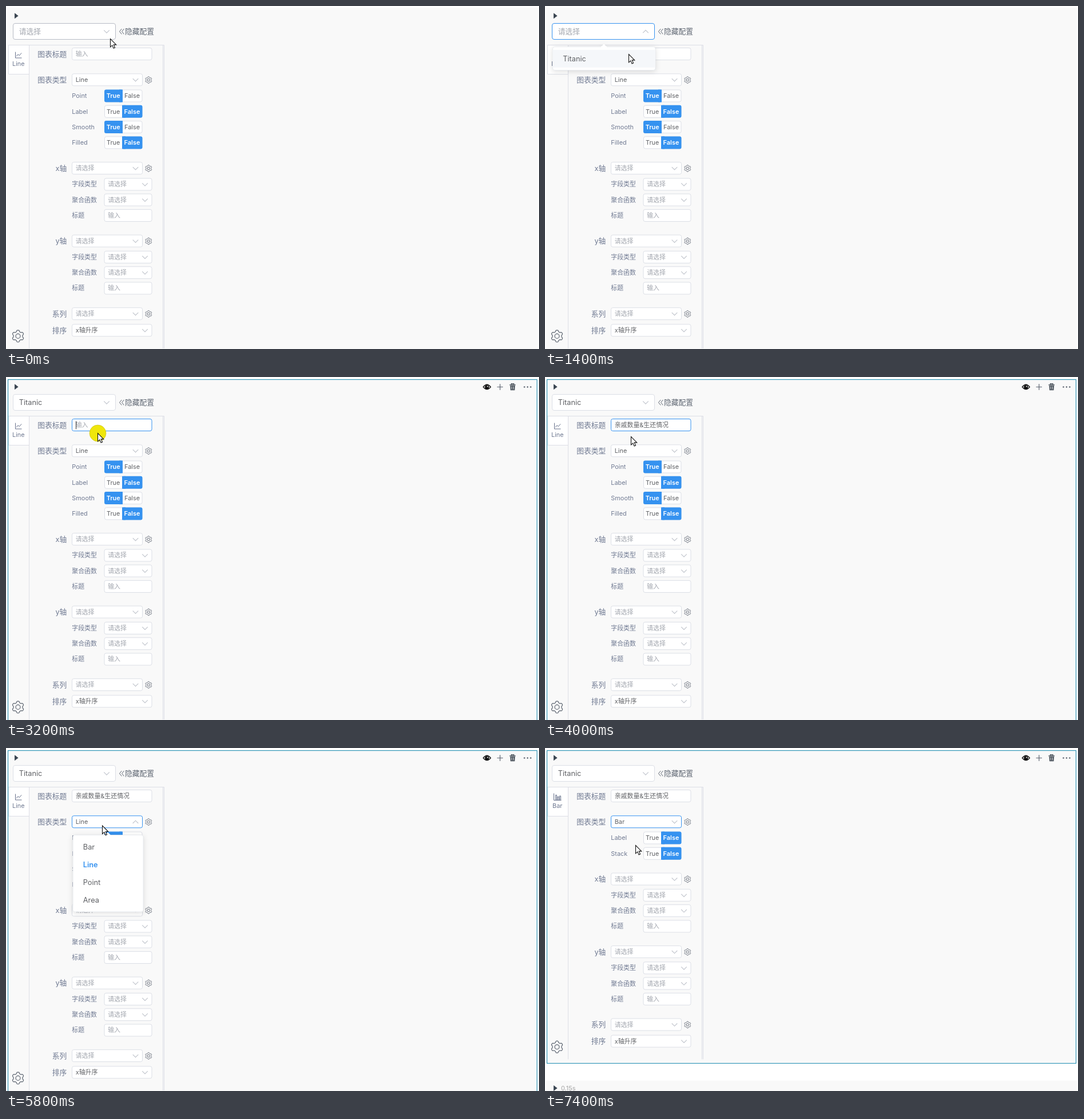
Write an HTML page that moves like this. It is 932 px wide and 601 px high and loops after 8000 ms.

```html
<!DOCTYPE html>
<html lang="zh-CN">
<head>
<meta charset="utf-8">
<title>Chart configuration</title>
<style>
  html, body { margin: 0; width: 100%; height: 100%; overflow: hidden; background: #fff; }
  svg { display: block; width: 932px; height: 601px; }
  text { font-family: Inter, 'Noto Sans CJK SC', 'Noto Sans CJK', sans-serif; white-space: pre; }
  .pop { filter: drop-shadow(0 2px 5px rgba(0, 0, 0, .13)); }
</style>
</head>
<body>
<svg id="stage" viewBox="0 0 932 601"></svg>
<script>
const LOOP = 8000, STEP = 200;
const BIG = 12.74, SMALL = 10.92, ROW = 27.3;
const BLUE = '#3592f0', EDGE = '#dcdfe6', HOVER = '#b8bcc5';
const INK = '#606266', LABEL = '#717b93', HINT = '#a3a7af', MARK = '#c0c4cc', ICON = '#5c6470';
const TITLE = '亲戚数量&amp;生还情况';

const stage = document.getElementById('stage');
const within = (t, a, b) => t >= a && t < b;

const text = (s, x, cy, size, fill, extra = '') =>
  `<text x="${x}" y="${cy + size * .365}" font-size="${size}" fill="${fill}" ${extra}>${s}</text>`;
const rect = (x, y, w, h, fill, extra = '') =>
  `<rect x="${x}" y="${y}" width="${w}" height="${h}" fill="${fill}" ${extra}/>`;
const stroke = (d, color, width = 1, extra = '') =>
  `<path d="${d}" fill="none" stroke="${color}" stroke-width="${width}" ${extra}/>`;
const fade = (opacity, content) => `<g opacity="${opacity}">${content}</g>`;

function chevron(x, y, up) {
  const d = up ? -2.4 : 2.4;
  return stroke(`M${x - 4.8} ${y - d}L${x} ${y + d}L${x + 4.8} ${y - d}`, MARK, 1.1);
}

function box(x, cy, w, value, color, border = EDGE) {
  return rect(x + .5, cy - 10.5, w - 1, 21, '#fff', `rx="3" stroke="${border}"`) +
    text(value, x + 6.7, cy, SMALL, color);
}

function select(x, cy, w, value, color = HINT, border = EDGE, up = false) {
  return box(x, cy, w, value, color, border) + chevron(x + w - 12.5, cy + .3, up);
}

function gear(x, y, r, width) {
  let d = '';
  for (let i = 0; i < 72; i++) {
    const a = i * Math.PI / 36;
    const q = r * (.88 + .12 * Math.tanh(-2.5 * Math.cos(6 * a)));
    d += `${i ? 'L' : 'M'}${(x + q * Math.cos(a)).toFixed(2)} ${(y + q * Math.sin(a)).toFixed(2)}`;
  }
  return stroke(d + 'Z', ICON, width, 'stroke-linejoin="round"') +
    `<circle cx="${x}" cy="${y}" r="${r * .38}" fill="none" stroke="${ICON}" stroke-width="${width}"/>`;
}

const label = (s, cy) => text(s, 106.3, cy, BIG, LABEL, 'text-anchor="end"');
const sublabel = (s, cy) => text(s, 115.3, cy, SMALL, LABEL);
const smallGear = cy => gear(249.3, cy + .3, 5.8, .95);

function toggle(name, on, cy) {
  const word = (s, x, active) =>
    text(s, x, cy, SMALL, active ? '#fff' : INK, `text-anchor="middle" font-weight="${active ? 600 : 400}"`);
  return sublabel(name, cy) +
    rect(172.5, cy - 10.5, 65.5, 21, '#fff', `rx="3" stroke="${EDGE}"`) +
    (on ? rect(172, cy - 11, 32, 22, BLUE, 'rx="3"') + rect(198, cy - 11, 6, 22, BLUE)
        : rect(203, cy - 11, 35.5, 22, BLUE, 'rx="3"') + rect(203, cy - 11, 6, 22, BLUE)) +
    word('True', 187.7, on) + word('False', 220.5, !on);
}

function axis(name, cy) {
  return label(name, cy) + select(115, cy, 124, '请选择') + smallGear(cy) +
    sublabel('字段类型', cy + 28.3) + select(171.5, cy + 28.3, 84, '请选择') +
    sublabel('聚合函数', cy + 55.5) + select(171.5, cy + 55.5, 84, '请选择') +
    sublabel('标题', cy + 82.8) + box(171.5, cy + 82.8, 84, '输入', HINT);
}

const playIcon = cy => `<path d="M15 ${cy - 5}L21.6 ${cy}L15 ${cy + 5}Z" fill="#3b4652"/>`;

function tools() {
  return `<path d="M834.5 17.5Q841 9 847.5 17.5Q841 25.5 834.5 17.5Z" fill="#fff" stroke="#111" stroke-width="1.4"/>
    <circle cx="841" cy="17.6" r="3.7" fill="#111"/><circle cx="842" cy="16.4" r="1" fill="#fff"/>` +
    stroke('M858.7 17.5H869M863.9 12.3V22.7', ICON, 1.2) +
    stroke('M880.5 13.8H891M883.6 13V11.8H888V13', '#505861', 1.4) +
    `<path d="M881.5 15H890.2L889.6 23.2H882.1Z" fill="#505861"/>` +
    stroke('M884.3 16.5V21.5M887.4 16.5V21.5', '#f9f9f9', .8) +
    [906.5, 912, 917.5].map(x => `<circle cx="${x}" cy="17.5" r="1.3" fill="${ICON}"/>`).join('');
}

function tab(bar) {
  const icon = bar
    ? 'M15.5 79.5V91.5H28.5M18.5 91V82.5H20.5V91M22 91V85.5H24V91M25.5 91V84H27.5V91'
    : 'M16.5 80.5V91H27.5M18.3 88L21 84.7L23.3 86.7L27.2 82.3';
  return rect(4, 69, 36, 50, '#fff') + stroke('M4.5 69V119.5H40', EDGE) +
    stroke(icon, '#66708a', 1) +
    text(bar ? 'Bar' : 'Line', 21.8, 101, SMALL, LABEL, 'text-anchor="middle"');
}

// A popper panel that unfolds downward from its top edge.
function popper(x, y, w, h, tip, rows, active, hovered, grow, opacity) {
  const items = rows.map((s, i) => {
    const cy = y + 21.3 + i * 31;
    const chosen = s === active;
    return (i === hovered ? rect(x + .5, cy - 15.5, w - 1, 31, '#f5f7fa') : '') +
      text(s, x + 18.3, cy, BIG, chosen ? BLUE : INK, `font-weight="${chosen ? 600 : 400}"`);
  }).join('');
  return `<g opacity="${opacity}" transform="translate(0 ${y * (1 - grow)}) scale(1 ${grow})">
    <g class="pop">${rect(x + .5, y + .5, w - 1, h - 1, '#fff', 'rx="3.5" stroke="#e4e7ed" stroke-width=".8"')}
    <path d="M${tip - 5.5} ${y + 1}L${tip} ${y - 4.6}L${tip + 5.5} ${y + 1}Z" fill="#fff"/></g>${items}</g>`;
}

const path = [
  [0, 182, 57], [600, 182, 57], [1200, 156, 74], [1400, 146, 84], [3800, 146, 84],
  [4000, 150, 104], [4600, 158, 129], [5600, 158, 129], [6200, 188, 149],
  [6600, 158, 170], [LOOP, 158, 170]
];
const presses = [[200, 600], [1800, 2200], [3000, 3400], [5200, 5600], [7000, 7400]];

function pointer(t) {
  const i = path.findIndex(p => p[0] > t);
  const [t0, x0, y0] = path[i - 1], [t1, x1, y1] = path[i];
  const k = (t - t0) / (t1 - t0);
  const down = presses.some(([a, b]) => within(t, a, b));
  const shift = down ? 14 : 0;
  return `<g transform="translate(${x0 + (x1 - x0) * k + shift + .5} ${y0 + (y1 - y0) * k + shift + .5})">` +
    (down ? '<circle r="14.4" fill="#efe60c" stroke="#c9c020" stroke-width=".7"/>' : '') +
    `<path d="M0 0V14.3L3.3 11.3L5.6 16.6L8 15.5L5.8 10.4H10.2Z" fill="#fff" stroke="#111" stroke-width="1.1"/></g>`;
}

function dataSelect(t) {
  const chosen = t >= 2000;
  const border = within(t, 200, 3000) ? BLUE : t < 200 ? HOVER : EDGE;
  return rect(12.5, 30.5, 179, 28, '#fff', `rx="3.5" stroke="${border}"`) +
    text(chosen ? 'Titanic' : '请选择', 22.8, 44.7, BIG, chosen ? INK : HINT) +
    chevron(176, 44.7, within(t, 400, 2000)) +
    stroke('M202.3 40L198.5 44.7L202.3 49.4M206.4 40L202.6 44.7L206.4 49.4', ICON) +
    text('隐藏配置', 208, 44.7, BIG, ICON);
}

function titleInput(t) {
  const filled = t >= 3400;
  const border = within(t, 3200, 5400) ? BLUE : within(t, 2200, 3200) ? HOVER : EDGE;
  return label('图表标题', 84) +
    box(115, 84, 140.5, filled ? TITLE : '输入', filled ? INK : HINT, border) +
    (within(t, 2600, 3400) ? stroke('M122.5 77.5V91.5', '#333') : '');
}

function typeSelect(t, bar) {
  const border = t >= 5400 ? BLUE : t >= 5200 ? '#8db8e4' : t >= 4400 ? HOVER : EDGE;
  return label('图表类型', 129.3) +
    select(115, 129.3, 124, bar ? 'Bar' : 'Line', INK, border, within(t, 5400, 7200)) + smallGear(129.3);
}

function draw(t) {
  const bar = t >= 7200;
  const active = t >= 3000;
  const lift = bar ? -2 * ROW : 0;
  const end = 600 + lift;
  const options = bar
    ? [['Label', false], ['Stack', false]]
    : [['Point', true], ['Label', false], ['Smooth', true], ['Filled', false]];

  let out = rect(2, 3, 928, bar ? 550 : 598, '#f9f9f9');
  if (active) out += rect(3.5, 4.5, 925, bar ? 548 : 604, 'none', 'stroke="#2a93b5" stroke-width="1.1"') + tools();
  out += playIcon(17.3) + dataSelect(t) + tab(bar) +
    stroke(`M4 68.5H276.5V${end}M274.5 69V${end}M40.5 69V${end}`, '#dcdee6') +
    titleInput(t) + typeSelect(t, bar) +
    options.map(([name, on], i) => toggle(name, on, 157.5 + i * ROW)).join('') +
    `<g transform="translate(0 ${lift})">` +
    axis('x轴', 284.2) + axis('y轴', 411.7) +
    label('系列', 539.2) + select(115, 539.2, 124, '请选择') + smallGear(539.2) +
    label('排序', 568.3) + select(115, 568.3, 140.5, 'x轴升序', INK) +
    gear(21, 578.4, 10.4, 1.2) + '</g>';

  if (bar) out += rect(2, 583, 928, 18, '#f9f9f9') + playIcon(596) + text('0.15s', 28, 596.5, SMALL, '#a5a5a5');

  if (within(t, 400, 2200)) {
    const partial = t < 600 || t >= 2000;
    out += popper(13, 71, 180.5, 42, 103, ['Titanic'], t >= 2000 ? 'Titanic' : '',
      t >= 1200 ? 0 : -1, t < 600 ? .6 : 1, partial ? .6 : 1);
  }
  if (within(t, 5400, 7400)) {
    const partial = t < 5600 || t >= 7200;
    out += popper(116.5, 152, 124, 135.5, 178, ['Bar', 'Line', 'Point', 'Area'], bar ? 'Bar' : 'Line',
      t >= 6200 ? 0 : -1, t < 5600 ? .6 : 1, partial ? .6 : 1);
  }
  return out + pointer(t);
}

let shown = -1;
const start = performance.now();

function tick() {
  const t = Math.floor((performance.now() - start) % LOOP / STEP) * STEP;
  if (t !== shown) {
    stage.innerHTML = draw(t);
    shown = t;
  }
  requestAnimationFrame(tick);
}
tick();
</script>
</body>
</html>
```
